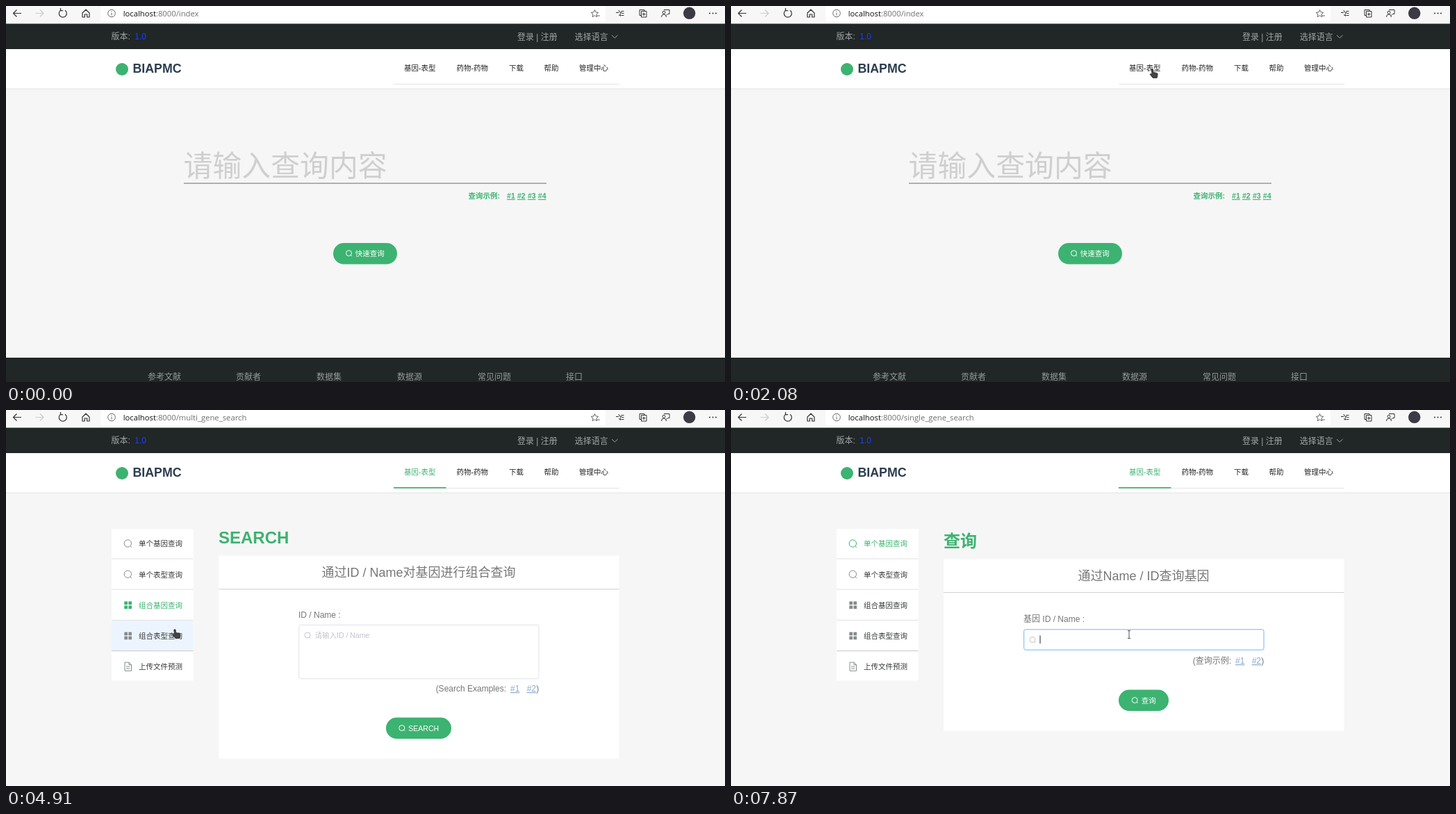
Animation, 1035 px wide and 541 px high, one loop 8000 ms. Source, as an HTML page:

```html
<!DOCTYPE html>
<html lang="zh-CN">
<head>
<meta charset="utf-8">
<style>
html, body { margin: 0; width: 100%; height: 100%; overflow: hidden; background: #f6f6f6; }
svg { display: block; width: 1035px; height: 541px; font-family: "Liberation Sans", "Noto Sans CJK SC", "Noto Sans CJK", sans-serif; }
text { white-space: pre; }
.url { font-family: "Open Sans", "Noto Sans", sans-serif; }
</style>
</head>
<body>
<svg id="stage" viewBox="0 0 1035 541"></svg>
<script>
const GREEN = '#3cb371', DARK = '#212626', LOOP = 8000, STEP = 77.6, START = 210;
const stage = document.getElementById('stage');

const rect = (x, y, w, h, fill, more = '') =>
  `<rect x="${x}" y="${y}" width="${w}" height="${h}" fill="${fill}" ${more}/>`;
const text = (x, y, size, fill, str, more = '') =>
  `<text x="${x}" y="${y}" font-size="${size}" fill="${fill}" ${more}>${str}</text>`;
const line = (d, color, width = 1) =>
  `<path d="${d}" fill="none" stroke="${color}" stroke-width="${width}"/>`;
const circle = (x, y, r, fill, more = '') =>
  `<circle cx="${x}" cy="${y}" r="${r}" fill="${fill}" ${more}/>`;
const magnifier = (x, y, r, color) =>
  circle(x, y, r, 'none', `stroke="${color}"`) +
  line(`M${x + r * .7} ${y + r * .7}l${r * .4} ${r * .4}`, color);
const BOLD = 'font-weight="bold"', LINK = 'text-decoration="underline"', MID = 'text-anchor="middle"';

function button(y, w, label, labelX) {
  const x = 594 - w / 2;
  return rect(x, y, w, 30.5, GREEN, 'rx="15.2"') +
    magnifier(labelX - 9.5, y + 15, 4, '#fff') + text(labelX, y + 19, 10.5, '#fff', label);
}

function browser(path) {
  const ink = '#333';
  return rect(0, 0, 1035, 26, '#f7f7f7') + rect(136, 0, 727, 22, '#fff', 'rx="2"') +
    line('M22 10.5H10.5M15.5 5.5l-5 5 5 5', ink, 1.2) +
    line('M42.5 10.5H54M49 5.5l5 5-5 5', '#ccc', 1.2) +
    line('M78.5 6.3A5.5 5.5 0 1 0 85 6.2M78.5 3v3.6h3.6', ink, 1.2) +
    line('M110 10l5-4.8 5 4.8v6h-3.3v-4h-3.4v4H110z', ink, 1.2) +
    circle(152, 10.5, 5.3, 'none', 'stroke="#666"') + line('M152 9.8v3.6M152 7.4v1.2', '#666') +
    text(168.7, 15, 11.27, '#111', `localhost<tspan fill="#707070">:8000/${path}</tspan>`, 'class="url"') +
    line('M847.5 5.5l1.5 3.4 3.8.4-2.8 2.6.7 3.8-3.2-2-3.3 2 .8-3.8-2.8-2.6 3.8-.4zM851 14h4', '#666') +
    line('M882 6l1.3 3 3 .3-2.3 2 .7 3-2.7-1.6M878 9.5h4M885.5 7.5h4M886.5 10.5h3M885.5 13.5h4', ink) +
    line('M914 13.5h-2v-8h7v2M914.5 7.5h7.5v8.5h-7.5zM918.2 9.5v4.5M916 11.8h4.5', ink) +
    line('M947 5.5h8v6h-2.5l-2 2M943.5 16q0-4 3.5-4t3.5 4', ink) + circle(947, 9.3, 2, 'none', `stroke="${ink}"`) +
    circle(983.7, 10.3, 8.7, '#3b3a45') +
    [1013, 1017.5, 1022].map(x => circle(x, 10.5, 1, ink)).join('');
}

function header(active) {
  const nav = [[573, '基因-表型'], [648.5, '药物-药物'], [724, '下载'], [774.5, '帮助'], [825, '管理中心']];
  const grey = '#a0a5a5';
  return rect(0, 25.5, 1035, 36.5, DARK) +
    text(151.5, 48.3, 12, grey, '版本:') + text(185.3, 48, 12, '#1840ff', '1.0') +
    text(736, 48.5, 12, grey, '登录 | 注册') + text(818.7, 48.5, 12, grey, '选择语言') +
    line('M872 42l4.3 4 4.3-4', grey) +
    rect(0, 118, 1035, 1, '#e4e4e4') + rect(0, 119, 1035, 1.5, '#efefef') + rect(0, 62, 1035, 56.5, '#fff') +
    circle(167, 91, 9, GREEN) + text(182.5, 96, 17.8, '#2c3e50', 'BIAPMC', BOLD) +
    rect(558, 112, 325, 1, '#e4e4e4') + (active ? rect(558, 111, 75.5, 1.7, GREEN) : '') +
    nav.map(([x, s], i) => text(x, 93.2, 10.5, active && !i ? GREEN : '#252525', s)).join('');
}

function home() {
  const foot = [[204, '参考文献'], [331, '贡献者'], [447, '数据集'], [563, '数据源'], [679, '常见问题'], [806, '接口']];
  return text(255.5, 245, 41.9, '#cfcfcf', '请输入查询内容') + rect(256, 254.3, 522, 1.7, '#a5a5a5') +
    text(665.5, 277, 10.5, GREEN, '查询示例:', BOLD) +
    [1, 2, 3, 4].map(n => text(706.2 + n * 14.9, 277, 10.5, GREEN, '#' + n, BOLD + LINK.padStart(30))).join('') +
    rect(471, 341, 92, 30.5, GREEN, 'rx="15.2"') + magnifier(493.5, 355.7, 4, '#fff') +
    text(502.8, 360, 10.5, '#fff', '快速查询') +
    rect(0, 506, 1035, 35, DARK) + foot.map(([x, s]) => text(x, 537.5, 12, '#949999', s)).join('');
}

function sidebar(active, hover) {
  const names = ['单个基因查询', '单个表型查询', '组合基因查询', '组合表型查询', '上传文件预测'];
  const squares = (y, c) => [0, 6].map(dx => [-5.3, .7].map(dy => rect(170.3 + dx, y + dy, 4.7, 4.7, c)).join('')).join('');
  return rect(152, 171, 117.5, 218.5, '#fff') + names.map((name, i) => {
    const y = 192.3 + 44.2 * i, c = i === active ? GREEN : '#858b8b';
    const icon = i < 2 ? magnifier(175.3, y - .3, 5.2, c) : i < 4 ? squares(y, c) :
      line(`M171 ${y - 6}h6l3.5 3.5v8.7H171zM177 ${y - 6}v3.5h3.5M173 ${y}h5.5M173 ${y + 3}h5.5`, c);
    return rect(152, 171 + 44 * i, 117.5, 43, '#ecf5ff', `opacity="${hover[i]}"`) + icon +
      text(191, y + 4, 10.5, i === active ? GREEN : '#363838', name) +
      (i < 4 ? rect(152, 213.5 + 44.2 * i, 117.5, 1, i < 3 ? '#e2e2e2' : '#c8c8c8') : '');
  }).join('');
}

function card(zh, title, bottom) {
  const top = zh ? 214.5 : 209.7;
  return text(306, zh ? 197 : 192, 24, GREEN, zh ? '查询' : 'SEARCH', BOLD) +
    rect(306, top, 576.5, bottom - top, '#fff') +
    text(594, top + 30.6, 18, '#777', title, MID) + rect(306, top + 47.6, 576.5, 1, '#cfcfcf');
}

function form({ zh, title, h = 30 }, focus) {
  const y = zh ? 315.5 : 309, end = y + h, by = end + (zh ? 57 : 55.5), grey = '#777', hint = '#c0c4cc';
  const eg = zh ? 365 : end + 18, blue = '#8aabd0';
  return card(zh, title, by + 59) +
    text(421, y - 10.5, 12, grey, (zh ? '基因 ' : '') + 'ID / Name :') +
    rect(421.7, y + .3, 345.3, h - .6, '#fff', `rx="2.5" stroke="${focus ? '#74b5f8' : '#dfe2e8'}"`) +
    magnifier(434, y + 15, 4, hint) +
    (zh ? '' : text(444.5, y + 18.6, 10.5, hint, '请输入ID / Name')) +
    (focus ? rect(444.5, 324.5, 1, 11.5, '#222') : '') +
    text(720, eg, 12, grey, zh ? '(查询示例:' : '(Search Examples:', 'text-anchor="end"') +
    text(726, eg, 12, blue, '#1', LINK) + text(749.7, eg, 12, blue, '#2', LINK) + text(763.2, eg, 12, grey, ')') +
    (zh ? button(by, 72, '查询', 590.7) : button(by, 94, 'SEARCH', 579.3));
}

function upload() {
  return card(false, '上传文件进行预测', 507) +
    rect(460, 282.5, 268.5, 133.5, 'none', 'rx="3" stroke="#d9d9d9" stroke-dasharray="2 1.5"') +
    '<path d="M582 349q-10-1-10-10 0-8 8-10 3-14 15-14 11 0 14 11 7 3 7 11 0 11-11 12z" fill="#c0c4cc"/>' +
    '<path d="M592.6 349v-10.5h-6l7.9-9 7.9 9h-6V349z" fill="#fff"/>' +
    text(525.7, 372.7, 10.5, '#606266', '将文件拖到此处，或<tspan fill="#409eff">点击上传</tspan>') +
    text(594.5, 434.5, 9, '#606266', '请上传.mat文件', MID) + button(453.8, 96, 'PREDICT', 578);
}

const pages = [
  { path: 'single_gene_search', zh: true, title: '通过Name / ID查询基因' },
  { path: 'single_phenotype_search', title: '通过ID / Name对表型进行查询' },
  { path: 'multi_gene_search', title: '通过ID / Name对基因进行组合查询', h: 78 },
  { path: 'multi_phenotype_search', title: '通过ID / Name对表型进行组合查询', h: 78 },
  { path: 'gp_upload_file' }
];
// [time of click, page]; the content follows the address a moment later
const visits = [[2080, 0], [3250, 1], [4090, 2], [4900, 3], [5220, 4], [6925, 0]];
const LAG = 150;
const pageAt = t => visits.reduce((p, [at, page]) => t >= at ? page : p, -1);
const hovers = [[3150, 3350, 1], [3850, 4200, 2], [4700, 5000, 3], [6550, 7000, 0]];

// [time, x, y] of the pointer tip
const route = [[210, 966, 512], [1020, 680, 167], [1550, 616, 91], [1850, 607, 89.5], [2250, 606, 92],
  [2700, 262, 226], [3050, 244.5, 230], [3600, 245, 232], [4050, 237, 272.5], [4500, 238, 275],
  [4740, 243, 316], [4950, 243, 316], [5350, 241, 368.5], [5900, 241, 368.5], [6300, 260, 275],
  [6700, 249, 191], [7050, 249, 191], [7550, 573, 323], [8000, 573, 323]];

function pointer(t, page) {
  if (t < START) return '';
  const i = Math.max(1, route.findIndex(k => k[0] >= t));
  const [t0, x0, y0] = route[i - 1], [t1, x1, y1] = route[i];
  const f = (t - t0) / (t1 - t0), x = x0 + (x1 - x0) * f, y = y0 + (y1 - y0) * f;
  const within = (l, top, r, b) => x > l && x < r && y > top && y < b;
  const place = `transform="translate(${x.toFixed(1)} ${y.toFixed(1)})"`;
  if (page === 0 && within(421, 315, 767, 345))
    return `<path ${place} d="M-2-5.5h4M0-5.5V5.5M-2 5.5h4" stroke="#555" fill="none"/>`;
  const hand = within(558, 62, 883, 113) || page >= 0 && within(152, 171, 269, 389);
  const d = hand ? 'M-1.2 1q0-1.3 1.2-1.3t1.3 1.3v3.3l5.2 1.2q1.5.4 1.3 2l-1 5h-6l-4-5q.4-1.3 1.8-.8l1.2 1z'
    : 'M0 0v14l3.2-3 2.2 5 2.2-1-2.2-4.8h4.6z';
  return `<path ${place} d="${d}" fill="#444" stroke="#262626" stroke-width=".8"/>`;
}

function scene(t) {
  const page = pageAt(t - LAG), address = pageAt(t);
  const hover = [0, 0, 0, 0, 0];
  for (const [from, to, row] of hovers)
    hover[row] = Math.max(0, Math.min(1, (t - from) / 150, (to + 150 - t) / 150)).toFixed(2);
  const body = page < 0 ? home() :
    sidebar(page, hover) + (page === 4 ? upload() : form(pages[page], t >= 7700));
  return rect(0, 0, 1035, 541, '#f6f6f6') + browser(address < 0 ? 'index' : pages[address].path) +
    header(page >= 0) + body + pointer(t, page);
}

let shown = -1;
function tick() {
  const now = performance.now() % LOOP;
  const t = now < START ? 0 : START + Math.floor((now - START) / STEP) * STEP;
  if (t !== shown) stage.innerHTML = scene(shown = t);
  requestAnimationFrame(tick);
}
tick();
</script>
</body>
</html>
```
